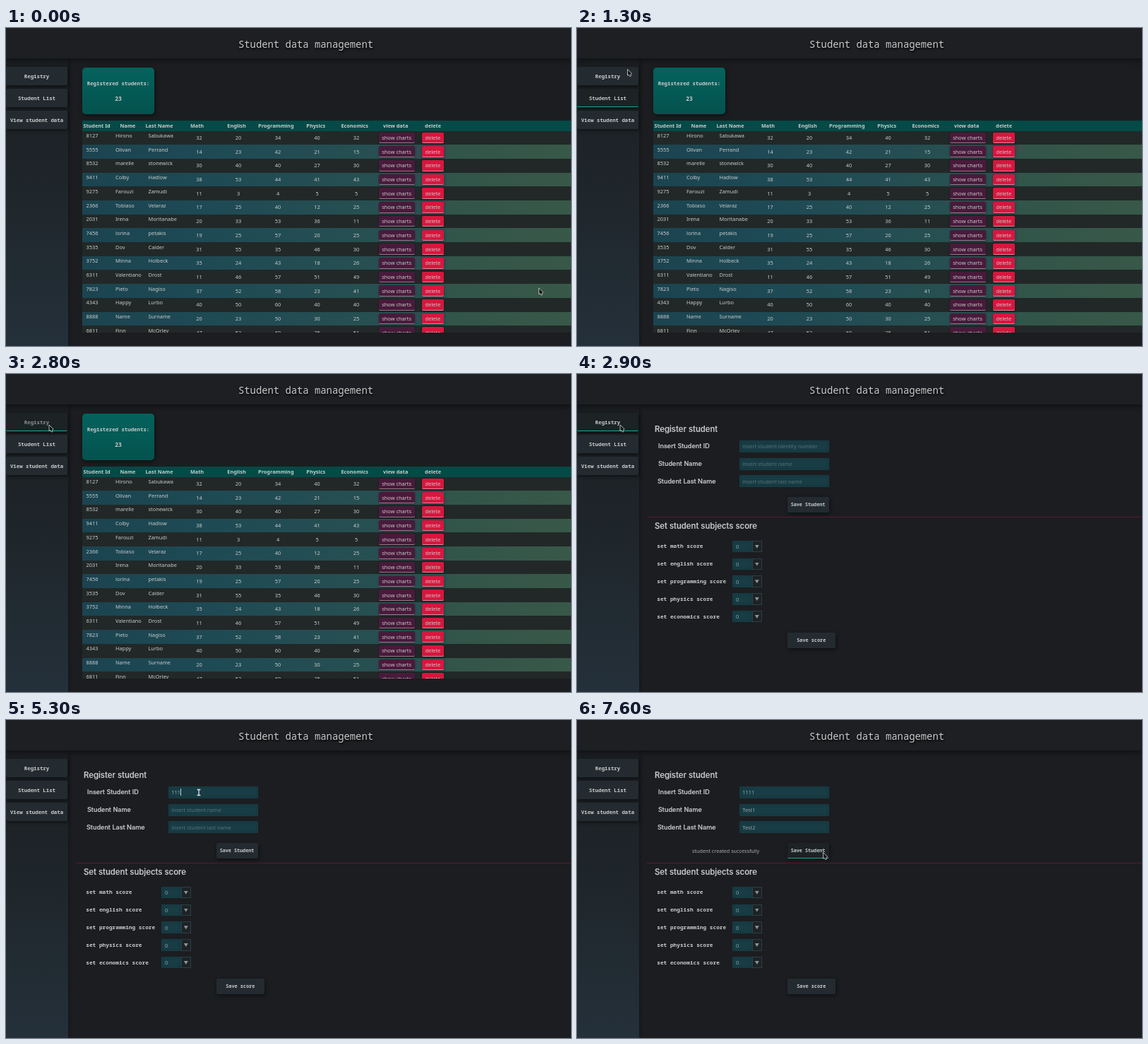
An HTML page that plays this animation: 800 px wide and 450 px high, repeating every 8000 ms.

```html
<!DOCTYPE html>
<html lang="en">
<head>
<meta charset="utf-8">
<title>Student data management</title>
<style>
html, body { margin: 0; width: 100%; height: 100%; overflow: hidden; background: #1c1d20; }
#stage { position: absolute; left: 0; top: 0; width: 800px; height: 450px; overflow: hidden; background: #1c1d20; color: #c9cbcb; }
#stage div { position: absolute; box-sizing: border-box; }
.view { left: 0; top: 0; width: 800px; height: 450px; }
.text { line-height: 0; white-space: pre; font: 7.4px/0 "Noto Sans", sans-serif; }
.mid { transform: translateX(-50%); }
.mono { font-family: "Noto Sans Mono", monospace; font-weight: 600; }
.inter { font-family: Inter, sans-serif; font-weight: 500; -webkit-text-stroke: .2px; }
.header { background: #1d1f22; box-shadow: 0 2px 9px rgba(0,0,0,.55); }
.side { background: linear-gradient(#1b1e21, #1f272c 50%, #24303a); box-shadow: 1px 0 4px rgba(0,0,0,.3); }
.button { background: #232b30; border-radius: 2px; box-shadow: 1px 2px 5px rgba(0,0,0,.5); border-bottom: 1px solid transparent; }
.hover { background: #1d2225; border-bottom-color: #21a39d; }
.press .text { color: #8b9090; }
.card { background: linear-gradient(#04625d, #04524e); border-radius: 5px; box-shadow: 1px 2px 6px rgba(0,0,0,.5); }
.rows { background: #222827; overflow: hidden; }
.head { background: #044a47; }
.even { background: linear-gradient(90deg, #1b4450, #1e4a55 25%, #2b5250 74.5%, #32554a 74.6%, #385848); }
.show, .delete { border-radius: 2px; border-bottom: 1px solid #98788f; background: #491a3b; box-shadow: 0 1px 3px rgba(0,0,0,.4); }
.delete { background: #d8163e; border-bottom-color: #d98a9d; }
.input { background: #183d45; border-radius: 1px; box-shadow: inset 0 0 4px #123038, inset 0 0 0 .5px #20515a; }
.hint { color: #587178; }
.value { color: #95a5a6; }
.caret { position: absolute; top: -5px; width: .8px; height: 10px; background: #c5d0d0; }
.arrow { background: #1e2225; border: 1px solid #284047; }
.line { background: #531c31; }
#cursor { position: absolute; left: 0; top: 0; overflow: visible; }
</style>
</head>
<body>
<div id="stage"></div>
<script>
const stage = document.getElementById('stage');

function box(parent, cls, x, y, w, h) {
  const el = document.createElement('div');
  el.className = cls;
  el.style.cssText = `left:${x}px;top:${y}px;width:${w}px;height:${h}px`;
  parent.append(el);
  return el;
}

// y is the middle of the capitals
function text(parent, str, x, y, cls = '', size = 7.4) {
  const el = document.createElement('div');
  el.className = 'text ' + cls;
  el.style.cssText = `left:${x}px;top:${y}px;font-size:${size}px`;
  el.textContent = str;
  parent.append(el);
  return el;
}

function button(parent, label, x, y, w, h, size) {
  const el = box(parent, 'button', x, y, w, h);
  text(el, label, w / 2, h / 2, 'mono mid', size);
  return el;
}

const view = () => box(stage, 'view', 0, 0, 800, 450);

// Frame of the page
box(stage, 'side', 0, 43, 88, 407);
const header = box(stage, 'header', 0, 0, 800, 43);
const title = text(header, 'Student data management', 424.5, 22.6, 'mono mid', 13.85);
title.style.cssText += ';font-weight:500;text-shadow:1px 2px 3px #000';
const [registry, list] = ['Registry', 'Student List', 'View student data']
  .map((label, i) => button(stage, label, 0, 55 + 31 * i, 87, 26, 7.38));

// Student list
const table = view();
const card = box(table, 'card', 107.5, 56.4, 102.4, 66);
text(card, 'Registered students:', 51.5, 22, 'mono mid', 7.38);
text(card, '23', 51.5, 43.6, 'mono mid', 8.1);

const students = `8127 Hirono Sabukawa 32 20 34 40 32
5555 Olivan Perrand 14 23 42 21 15
8532 marelle stonewick 30 40 40 27 30
9411 Colby Hadlow 38 53 44 41 43
9275 Farouzi Zamudi 11 3 4 5 5
2366 Tobiaso Velaraz 17 25 40 12 25
2031 Irena Moritanabe 20 33 53 36 11
7456 lorina petakis 19 25 57 20 25
3535 Dov Calder 31 55 35 46 30
3752 Minna Holbeck 35 24 43 18 26
6311 Valentiano Drost 11 46 57 51 49
7823 Pieto Nagiso 37 52 58 23 41
4343 Happy Lurbo 40 50 60 40 40
8888 Name Surname 20 23 50 30 25
6811 Finn McOrley 47 52 60 35 51`.split('\n');

const rows = box(table, 'rows', 108, 131, 692, 299.5);
const columns = [5.5, 47, 93.5, 165.5, 221, 277, 332.5, 388];
students.forEach((line, i) => {
  const y = 14.4 + 19.7 * i;
  const row = box(rows, i % 2 ? 'even' : '', 0, y, 692, 19.7);
  line.split(' ').forEach((cell, c) =>
    text(row, cell, columns[c], c < 3 ? 6.7 : 9.5, c < 3 ? '' : 'mid'));
  text(box(row, 'show', 419.6, 2.3, 51.4, 15.6), 'show charts', 25.5, 7.3, 'mid');
  text(box(row, 'delete', 480.7, 2.3, 31.6, 15.6), 'delete', 15.6, 7.3, 'mid');
});
const head = box(rows, 'head', 0, 0, 692, 15);
[['Student Id', 20.5], ['Name', 64.5], ['Last Name', 109], ['Math', 162.5], ['English', 218.5],
 ['Programming', 274.3], ['Physics', 330.7], ['Economics', 385.7], ['view data', 443.7], ['delete', 496.5]]
  .forEach(([label, x]) => { text(head, label, x, 7.2, 'mid', 7.3).style.fontWeight = 700; });

// Registration form
const form = view();
text(form, 'Register student', 110, 77.7, 'inter', 11.4);
text(form, 'Set student subjects score', 110, 214.6, 'inter', 11.4);
box(form, 'line', 99, 201.5, 701, 1);

const fields = [['Insert Student ID', 115, 'identity number'], ['Student Name', 115, 'name'], ['Student Last Name', 114, 'last name']]
  .map(([label, x, hint], i) => {
    const y = 102.4 + 24.8 * i;
    text(form, label, x, y, 'inter', 9.1);
    const input = text(box(form, 'input', 229.5, y - 8.6, 127.5, 17), '', 4.8, 8.6);
    const [value, caret, prompt] = ['value', 'caret', 'hint'].map(cls => {
      const el = document.createElement('span');
      el.className = cls;
      input.append(el);
      return el;
    });
    prompt.textContent = 'insert student ' + hint;
    return { value, caret, prompt };
  });

const save = button(form, 'Save Student', 297.5, 173.5, 59, 22.5, 6.75);
button(form, 'Save score', 297.5, 365.7, 68.5, 22.5, 6.85);
const message = text(form, 'student created successfully', 163, 184.6, '', 7.2);
message.style.color = '#a9abab';

['math', 'english', 'programming', 'physics', 'economics'].forEach((subject, i) => {
  const y = 244 + 24.8 * i;
  text(form, `set ${subject} score`, 113.3, y - .7, 'mono', 7.78);
  text(box(form, 'input', 220, y - 8.3, 28, 16.6), '0', 5, 8.6, 'value');
  const arrow = box(form, 'arrow', 247.5, y - 8.3, 14.5, 16.6);
  box(arrow, '', 3.3, 5, 6, 5).style.cssText += ';background:#8d9494;clip-path:polygon(0 0,100% 0,50% 100%)';
});

// Pointer
stage.insertAdjacentHTML('beforeend', `<svg id="cursor" width="1" height="1">
  <path id="pointer" d="M0 0V8.6L2 7.6L3.2 10L5 9.4L4.4 7.2L6.2 6Z" fill="#151618" stroke="#d8d8d8" stroke-width=".8" stroke-linejoin="round"/>
  <path id="beam" d="M-2.4 -4H2.4M-2.4 4H2.4M0 -4V4" fill="none" stroke="#e2e2e2" stroke-width="1.3"/>
</svg>`);
const cursor = document.getElementById('cursor');
const pointer = document.getElementById('pointer');
const beam = document.getElementById('beam');

const path = [[0, 754.5, 368], [1200, 75, 95], [1300, 71.5, 58.5], [1700, 61, 72], [3600, 61, 72],
  [4000, 273, 102.5], [6100, 273, 102.5], [6400, 318, 152], [6600, 318, 152], [7000, 348.5, 187.5]];
const typed = [
  [[0, ''], [4800, '1'], [5100, '11'], [5300, '111'], [5900, '1111']],
  [[0, ''], [6200, 'Test1']],
  [[0, ''], [6300, 'Test2']]];
const focus = [[0, -1], [4000, 0], [4500, -1], [4800, 0], [5800, -1], [5900, 0],
  [6200, 1], [6300, 2], [6700, -1], [7200, 2], [7400, -1]];

const at = (steps, t) => steps.filter(s => s[0] <= t).pop()[1];
const within = (t, from, to) => t >= from && t < to;
const show = (el, on) => { el.style.display = on ? '' : 'none'; };

function position(t) {
  const i = path.findIndex(p => p[0] > t);
  if (i < 0) return path[path.length - 1].slice(1);
  const [a, b] = [path[i - 1], path[i]];
  const k = (t - a[0]) / (b[0] - a[0]);
  const e = k * k * (3 - 2 * k);
  return [a[1] + (b[1] - a[1]) * e, a[2] + (b[2] - a[2]) * e];
}

function draw(now) {
  const t = Math.floor(now % 8000 / 100) * 100;
  show(table, t < 2900);
  show(form, t >= 2900);

  list.classList.toggle('hover', within(t, 1200, 1400));
  registry.classList.toggle('hover', within(t, 1400, 3700));
  registry.classList.toggle('press', t === 2800);
  save.classList.toggle('hover', t >= 6900);
  save.classList.toggle('press', t === 7400);
  show(message, t >= 7500);

  fields.forEach((f, i) => {
    const str = at(typed[i], t);
    f.value.textContent = str;
    show(f.prompt, !str);
    show(f.caret, at(focus, t) === i);
  });

  const [x, y] = position(t);
  const typing = within(t, 3900, 6800);
  cursor.style.transform = `translate(${x}px,${y}px)`;
  show(beam, typing);
  show(pointer, !typing);
}

const start = performance.now();
function loop() {
  draw(performance.now() - start);
  requestAnimationFrame(loop);
}
loop();
</script>
</body>
</html>
```
